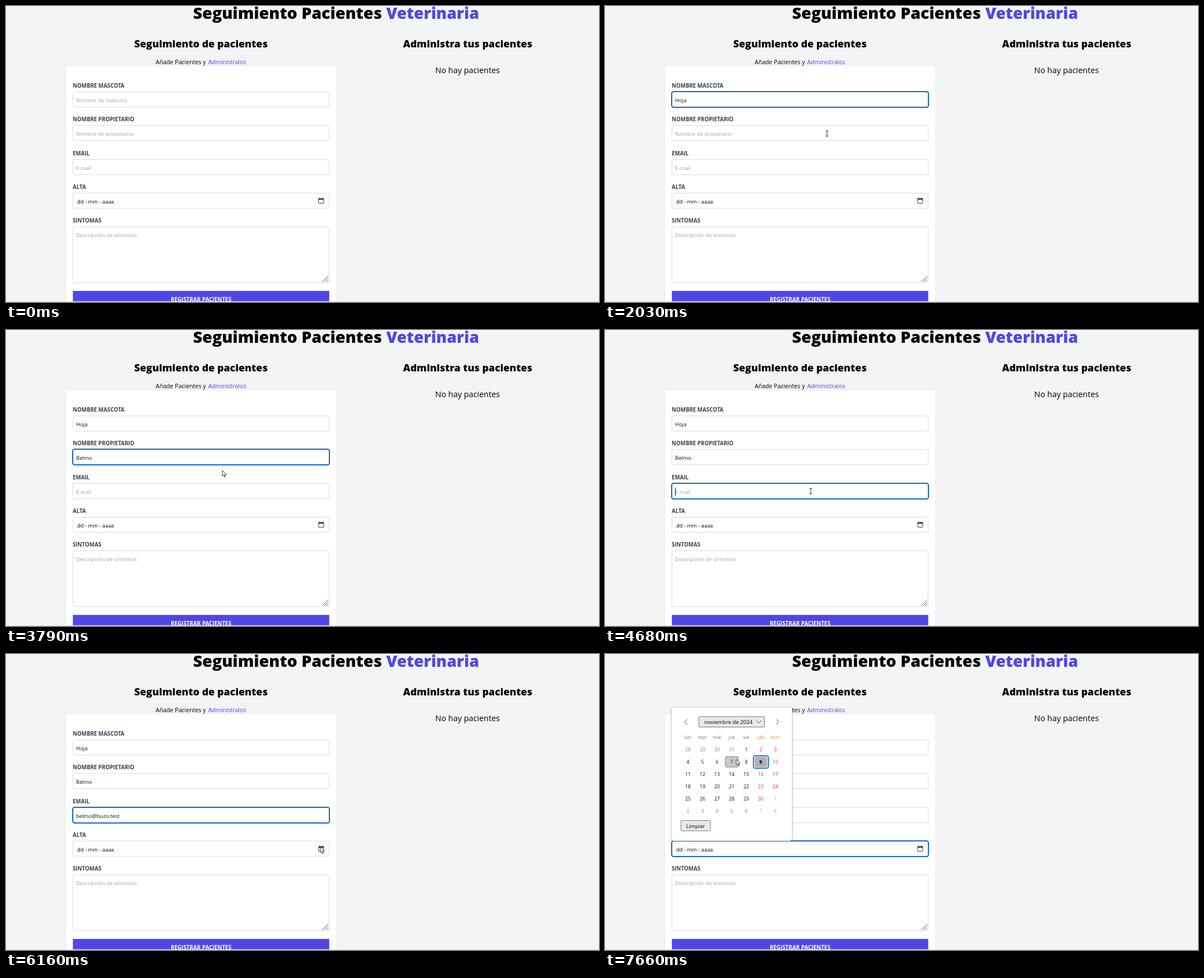
Write an HTML page with a canvas that moves like this. It is 1058 by 529 pixels and loops after 8000 ms.

```html
<!DOCTYPE html>
<html lang="es">
<head>
<meta charset="utf-8">
<style>
  html, body { margin: 0; width: 100%; height: 100%; overflow: hidden; background: #f3f4f6; }
  canvas { display: block; }
</style>
</head>
<body>
<canvas id="stage" width="1058" height="529"></canvas>
<script>
const ctx = document.getElementById('stage').getContext('2d');
const LOOP = 8000, CALENDAR_OPEN = 6560;
const INDIGO = '#4f46e5', BLUE = '#1163cc', BORDER = '#d9dbe0';

// Each value is [time, text]; the latest one reached is shown.
const fields = [
  { label: 'NOMBRE MASCOTA', hint: 'Nombre de mascota', focus: 750, blur: 2110,
    values: [[1080, 'h'], [1700, 'Hoja']], list: { from: 1150, to: 1700, items: ['Hoja', 'Hojas'] } },
  { label: 'NOMBRE PROPIETARIO', hint: 'Nombre de propietario', focus: 2110, blur: 4330, caretEnd: 2640,
    values: [[3170, 'b'], [3790, 'Belmo']], list: { from: 3240, to: 3790, items: ['Belmo'] } },
  { label: 'EMAIL', hint: 'E-mail', focus: 4330, blur: 6360,
    values: [[4810, 'b'], [5690, 'belmo@buzo.test']], list: { from: 4880, to: 5690, items: ['belmo@buzo.test'] } },
  { label: 'ALTA', focus: 6360, blur: LOOP },
].map((field, i) => ({ ...field, y: 153.5 + Math.round(i * 60.3) }));

const path = [
  [70, 986, 511], [680, 412, 170], [1220, 412, 172], [1450, 411, 194], [1770, 411, 194],
  [1990, 396, 228], [3440, 396, 228], [3640, 386, 251], [4050, 386, 251], [4270, 367, 288],
  [4950, 367, 288], [5150, 350, 319], [5300, 350, 319], [5490, 347, 310], [5900, 347, 310],
  [6150, 561, 345], [6770, 561, 345], [7500, 251, 200], [7570, 251, 200], [7655, 234, 188],
];
const hiddenSpans = [[0, 70], [1080, 1220], [3170, 3440], [4810, 4950]];

const within = (v, from, to) => v >= from && v < to;
const inRect = (p, x, y, w, h) => p && within(p.x, x, x + w) && within(p.y, y, y + h);

function text(str, x, y, size, color = '#000', weight = 400, align = 'left') {
  ctx.font = `${weight} ${size}px "Open Sans", "Noto Sans", sans-serif`;
  ctx.textAlign = align;
  ctx.fillStyle = color;
  ctx.fillText(str, x, y);
}

function box(x, y, w, h, r, fill, stroke, lineWidth = 1) {
  ctx.beginPath();
  ctx.roundRect(x, y, w, h, r);
  if (fill) { ctx.fillStyle = fill; ctx.fill(); }
  if (stroke) { ctx.strokeStyle = stroke; ctx.lineWidth = lineWidth; ctx.stroke(); }
}

function line(points, color, width = 1) {
  ctx.beginPath();
  points.forEach(([x, y]) => ctx.lineTo(x, y));
  ctx.strokeStyle = color;
  ctx.lineWidth = width;
  ctx.stroke();
}

function shadowBox(x, y, w, h, r, blur, color) {
  ctx.save();
  ctx.shadowBlur = blur;
  ctx.shadowColor = color;
  ctx.shadowOffsetY = 1;
  box(x, y, w, h, r, '#fff');
  ctx.restore();
}

function pointerAt(t) {
  if (hiddenSpans.some(([from, to]) => within(t, from, to))) return null;
  const next = path.findIndex(key => key[0] > t);
  if (next < 0) { const [, x, y] = path.at(-1); return { x, y }; }
  const [t0, x0, y0] = path[next - 1], [t1, x1, y1] = path[next];
  const k = (t - t0) / (t1 - t0), ease = k * k * (3 - 2 * k);
  return { x: x0 + (x1 - x0) * ease, y: y0 + (y1 - y0) * ease };
}

function drawPage() {
  ctx.fillStyle = '#f3f4f6';
  ctx.fillRect(0, 0, 1058, 529);
  text('Seguimiento Pacientes', 333.7, 23, 28.6, '#000', 900);
  text('Veterinaria', 844, 23, 28.2, INDIGO, 900, 'right');
  text('Seguimiento de pacientes', 347.8, 74, 17.9, '#000', 900, 'center');
  text('Administra tus pacientes', 823.8, 74, 17.8, '#000', 900, 'center');
  text('Añade Pacientes y', 267, 103.7, 10.6);
  text('Admínistralos', 428.5, 103.7, 10.6, INDIGO, 400, 'right');
  text('No hay pacientes', 823.5, 119.5, 14.4, '#000', 400, 'center');

  shadowBox(107, 108, 482.5, 440, 5, 3, 'rgba(0,0,0,.1)');
  text('SINTOMAS', 119, 386.6, 9.75, '#374151', 700);
  box(119.5, 394.5, 457, 100, 3, '#fff', BORDER);
  text('Descripción de sintomas', 125, 412.8, 9.5, '#9ca3af');
  for (const d of [11, 7, 3]) line([[575 - d, 493], [575, 493 - d]], '#555', 0.9);
  ctx.fillStyle = INDIGO;
  ctx.fillRect(119.3, 509.2, 457.4, 18.5);
  text('REGISTRAR PACIENTES', 348, 527.6, 9.9, '#fff', 700, 'center');
  ctx.fillStyle = '#e0e2e7';
  ctx.fillRect(0, 528, 1058, 1);
}

function drawField({ label, hint, focus, blur, caretEnd, values, y }, t) {
  text(label, 119, y - 8, 9.75, '#374151', 700);
  const focused = within(t, focus, blur);
  if (focused) box(119, y - 0.5, 458, 28, 3.5, '#fff', BLUE, 2);
  else box(119.5, y, 457, 27, 3, '#fff', BORDER);

  if (!values) {
    text('dd - mm - aaaa', 127, y + 18.3, 9.4);
    box(557.8, y + 9.7, 9, 8.5, 1, null, '#333');
    ctx.fillStyle = '#333';
    ctx.fillRect(557.5, y + 9.3, 9.6, 2.4);
    ctx.fillRect(559, y + 8, 1.2, 2);
    ctx.fillRect(564.4, y + 8, 1.2, 2);
    return;
  }
  const value = values.findLast(v => t >= v[0]);
  text(value ? value[1] : hint, 125, y + 18, 9.5, value ? '#111' : '#9ca3af');
  if (focused && t < (caretEnd ?? values[0][0])) {
    ctx.fillStyle = '#222';
    ctx.fillRect(125, y + 7.5, 1, 14);
  }
}

function drawList({ list, y }, t, pointer) {
  if (!list || !within(t, list.from, list.to)) return;
  const top = y + 27, height = 15.8;
  box(119.5, top, 456, list.items.length * height + 0.6, 0, '#fff', '#8c8c8c');
  list.items.forEach((item, i) => {
    const itemTop = top + 0.3 + i * height;
    if (inRect(pointer, 119, itemTop, 457, height)) {
      ctx.fillStyle = '#dedede';
      ctx.fillRect(120, itemTop, 455, height);
    }
    text(item, 123, itemTop + 11.9, 8.9, '#222');
  });
}

function dayColor(current, weekend) {
  if (weekend) return current ? '#d93a32' : '#eda184';
  return current ? '#111' : '#858585';
}

function drawCalendar(t, pointer) {
  const reveal = Math.min(1, (t - CALENDAR_OPEN) / 200);
  if (reveal <= 0) return;
  ctx.save();
  ctx.beginPath();
  ctx.rect(112, 334 - 242 * reveal, 230, 242 * reveal + 0.5);
  ctx.clip();
  shadowBox(119, 96, 214.5, 238, 4, 4, 'rgba(0,0,0,.4)');

  line([[147, 116.5], [142.5, 121.2], [147, 126]], '#555');
  line([[305.5, 116.5], [310, 121.2], [305.5, 126]], '#555');
  box(167.5, 112, 117, 18.5, 1, '#e9e9e9', '#767676');
  text('noviembre de 2024', 177, 124.8, 9.6);
  line([[270, 119], [274.5, 123.5], [279, 119]], '#444');

  ['lun', 'mar', 'mié', 'jue', 'vie', 'sáb', 'dom'].forEach((name, c) =>
    text(name, 148 + c * 26, 152, 8.2, c > 4 ? '#e58a5c' : '#777', 400, 'center'));

  for (let i = 0; i < 42; i++) {
    const day = i - 3, current = day > 0 && day < 31;
    const shown = day < 1 ? day + 31 : current ? day : day - 30;
    const x = 148 + i % 7 * 26, y = 171 + Math.floor(i / 7) * 22, today = day === 9;
    if (today) {
      box(x - 13.2, y - 11.2, 26.8, 22.4, 3.5, '#fff', BLUE, 1.8);
      box(x - 11, y - 9.2, 22.4, 18.4, 2, '#b0b0b0');
    } else if (inRect(pointer, x - 12, y - 10, 24, 21)) {
      box(x - 11, y - 9.5, 22.5, 18.5, 1.5, '#cbcbcb', '#767676');
    }
    text(shown, x, y + 3.4, 8.7, today ? '#000' : dayColor(current, i % 7 > 4), today ? 700 : 400, 'center');
  }
  box(135.5, 297.5, 52.5, 18.5, 1.5, '#e9e9e9', '#767676');
  text('Limpiar', 161.5, 310.8, 9.5, '#000', 400, 'center');
  ctx.restore();
}

function drawPointer(pointer, calendarOpen) {
  if (!pointer) return;
  const overText = !(calendarOpen && pointer.x < 334) &&
    (fields.some(f => f.values && inRect(pointer, 119, f.y, 458, 27)) || inRect(pointer, 119, 394, 458, 100));
  ctx.save();
  ctx.translate(pointer.x, pointer.y);
  if (overText) {
    line([[0, -4.5], [0, 4.5]], '#222');
    line([[-2.5, -4.8], [2.5, -4.8]], '#222');
    line([[-2.5, 4.8], [2.5, 4.8]], '#222');
  } else {
    const arrow = new Path2D('M0 0V10.2L2.4 8L4 11.7L5.6 11L4 7.4H7Z');
    ctx.fillStyle = '#fff';
    ctx.fill(arrow);
    ctx.strokeStyle = '#222';
    ctx.lineWidth = 0.9;
    ctx.stroke(arrow);
  }
  ctx.restore();
}

function draw(now) {
  const t = now % LOOP, pointer = pointerAt(t);
  drawPage();
  fields.forEach(field => drawField(field, t));
  fields.forEach(field => drawList(field, t, pointer));
  drawCalendar(t, pointer);
  drawPointer(pointer, t > CALENDAR_OPEN);
  requestAnimationFrame(draw);
}
requestAnimationFrame(draw);
</script>
</body>
</html>
```
